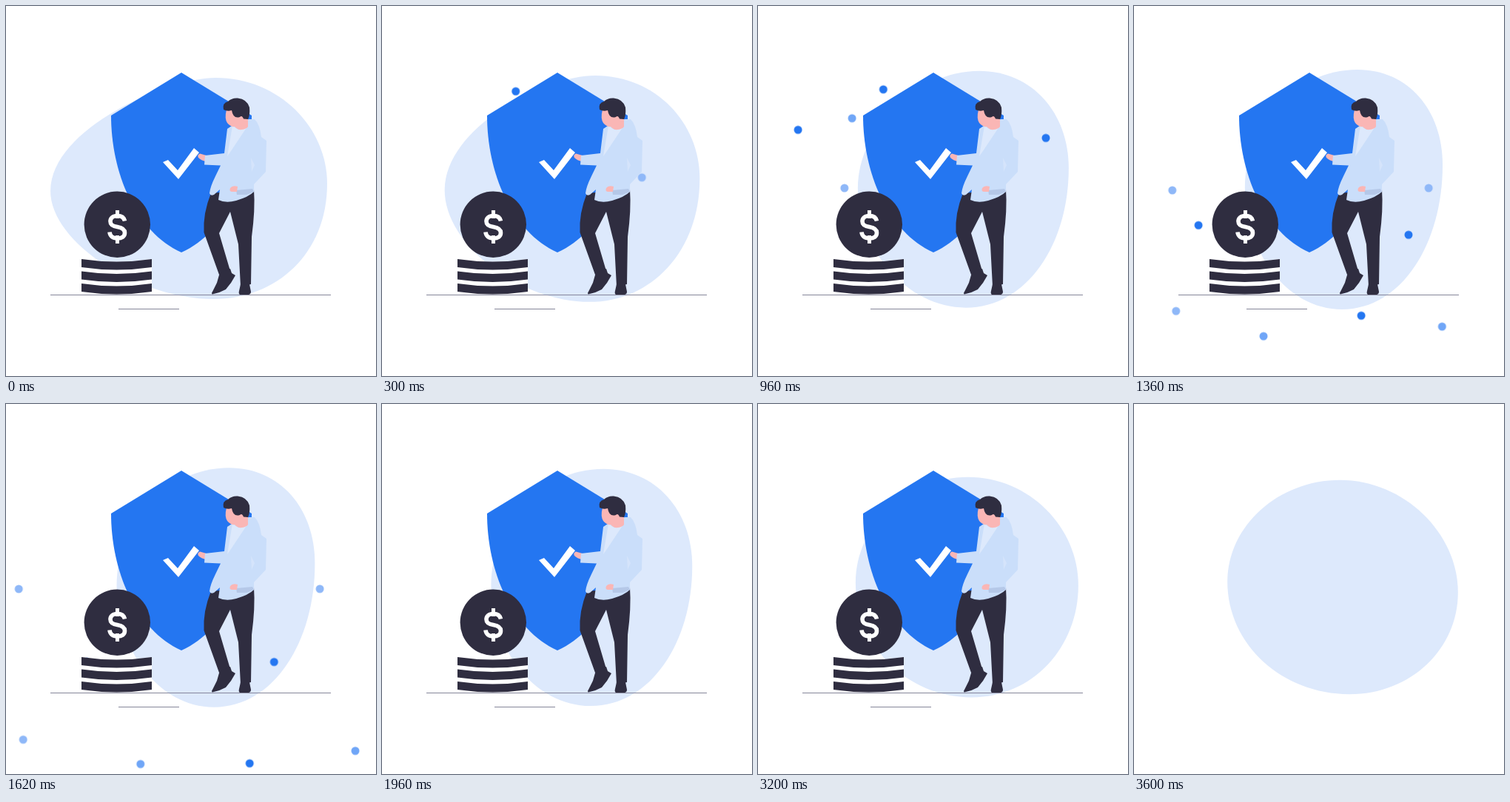
Animation, 500 px wide and 500 px high, one loop 3.62 s. Source, as an HTML page without scripts:

```html
<!DOCTYPE html>
<html lang="en">
<head>
<meta charset="utf-8">
<title>Secure savings</title>
<style>
  html, body { margin: 0; width: 100%; height: 100%; overflow: hidden; background: #fff; }
  svg { display: block; width: 100%; height: 100%; }

  .ink { fill: #2f2d40; }
  .blue { fill: #2476f1; }
  .mid { fill: #70a6f7; }
  .pale { fill: #8fb8f8; }
  .skin { fill: #fab6b5; }
  .coat { fill: #cadefa; }
  .tint { fill: #dde9fc; }

  .blob { animation: morph 3620ms infinite; }
  .scene { animation: blink 3620ms step-end infinite; }
  .dots circle { animation: drift 3620ms linear infinite; }

  @keyframes morph {
    0% {
      d: path("M283 97C370 97 434 165 434 240C434 335 365 396 280 396C180 396 60 320 60 250C60 165 220 97 283 97Z");
      animation-timing-function: cubic-bezier(.167, .167, .667, 1);
    }
    38.67% {
      d: path("M302 86C370 86 417 140 417 215C417 320 362 410 281 410C205 410 150 330 150 245C150 165 215 86 302 86Z");
      animation-timing-function: cubic-bezier(.36, 0, .833, .833);
    }
    100% {
      d: path("M278 103C365 103 438 175 438 255C438 330 375 392 291 392C200 392 126 325 126 240C126 165 195 103 278 103Z");
    }
  }

  /* Everything but the blob drops out for the last beat of the loop. */
  @keyframes blink {
    0% { visibility: visible; }
    99.44%, 100% { visibility: hidden; }
  }

  /* Each dot leaves from behind the shield and passes through its own stops. */
  @keyframes drift {
    0% { transform: translate(237px, 210px); opacity: 1; }
    14.92% { transform: translate(var(--a)); }
    26.52% { transform: translate(var(--b)); }
    37.57% { transform: translate(var(--c)); animation-timing-function: ease-out; }
    46% { transform: translate(var(--d)); opacity: 1; }
    52%, 100% { transform: translate(var(--d)); opacity: 0; }
  }
</style>
</head>
<body>
<svg viewBox="0 0 500 500">
  <path class="blob tint" d="M283 97C370 97 434 165 434 240C434 335 365 396 280 396C180 396 60 320 60 250C60 165 220 97 283 97Z"/>

  <g class="scene">
    <g class="dots">
      <circle class="blue" r="5.5" style="--a:136px,40px; --b:54px,167px; --c:87px,296px; --d:110px,350px"/>
      <circle class="blue" r="5.5" style="--a:260px,180px; --b:389px,178px; --c:371px,309px; --d:362px,350px"/>
      <circle class="blue" r="5.5" style="--a:137px,205px; --b:169px,112px; --c:307px,418px; --d:330px,488px"/>
      <circle class="mid" r="5.5" style="--a:284px,37px; --b:127px,151px; --c:175px,446px; --d:182px,488px"/>
      <circle class="mid" r="5.5" style="--a:240px,180px; --b:250px,230px; --c:416px,433px; --d:474px,470px"/>
      <circle class="pale" r="5.5" style="--a:442px,249px; --b:320px,225px; --c:398px,246px; --d:425px,250px"/>
      <circle class="pale" r="5.5" style="--a:210px,230px; --b:117px,246px; --c:52px,249px; --d:16px,250px"/>
      <circle class="pale" r="5.5" style="--a:200px,240px; --b:150px,290px; --c:57px,412px; --d:22px,455px"/>
    </g>

    <path d="M60 390.5H439M152 409.5H234" stroke="#85869a"/>

    <!-- shield -->
    <path class="blue" d="M237 90L332 148C332 225 299 305 237 333C175 305 142 225 142 148Z"/>
    <path fill="#fff" d="M212 211L219 208L232 222L254 192L261 198L233 234Z"/>

    <!-- coins -->
    <path fill="#fff" d="M102 342q47.5 7 95 0v44h-95z"/>
    <defs><path id="coin" class="ink" d="M102 342q47.5 7 95 0v11q-47.5 7-95 0z"/></defs>
    <use href="#coin"/>
    <use href="#coin" y="16.5"/>
    <use href="#coin" y="33"/>
    <circle class="ink" cx="150.3" cy="295.3" r="44.7"/>
    <g fill="none" stroke="#fff">
      <path stroke-width="5.6" d="M160.5 290.5c-1-5-5-7-10-7-6 0-9.500 3-9.500 7.500 0 5 3.500 6.500 9.500 7.500s10 3 10 8-4 7.500-10 7.500-10-3-10.500-8.500"/>
      <path stroke-width="5" d="M150.500 276v11M150.500 310v11"/>
    </g>

    <!-- man -->
    <path class="ink" d="M277 253Q266 280 267.500 306L288 363L303 358L288 307L303 278L314 322L317 379L331 376L332 312Q337 275 335 248Z"/>
    <path class="ink" d="M289 360L303 355L305 361L310 364Q305 374 297 383Q288 388 279 389.500Q277 389 279 386L285 374Z"/>
    <path class="ink" d="M317 376H329L331 386Q331 389.500 328 390H316Q314 389 315 385Z"/>
    <path class="skin" d="M271 202L262 199.500Q258 201 260 205Q264 209 270 210Z"/>
    <path class="coat" d="M305 162L299 166L295 199L269 202L268 214.500L290 215.500L283 230Q276 244 275 253Q276 257 281 255L289 248L287 262Q297 267 311 263Q328 258 335 251V241L351 224L352 182L345 177Q343 160 336 153L328 153Z"/>
    <path class="tint" d="M306 162L314 167L326 163L304 196L299 203Z"/>
    <path fill="#d5e4fb" d="M331 205L336 215L332 224Z"/>
    <path fill="#b5c8e8" d="M311 249L333 247L335 251L325 255L312 255Z"/>
    <path class="skin" d="M313 244Q306 242 303 246Q301 251 306 251L312 251Z"/>
    <path class="skin" d="M298 140Q295 152 299 158Q304 164 309 163Q313 168 319 167Q325 166 327 163V148L312 137Z"/>
    <path class="ink" d="M294 140Q292 131 300 129Q305 124 313 124.500Q326 126 329 137Q330 147 327 153L321 152.500Q319 147 316 150Q307 153 305 141Q299 143 294 140Z"/>
  </g>
</svg>
</body>
</html>
```
